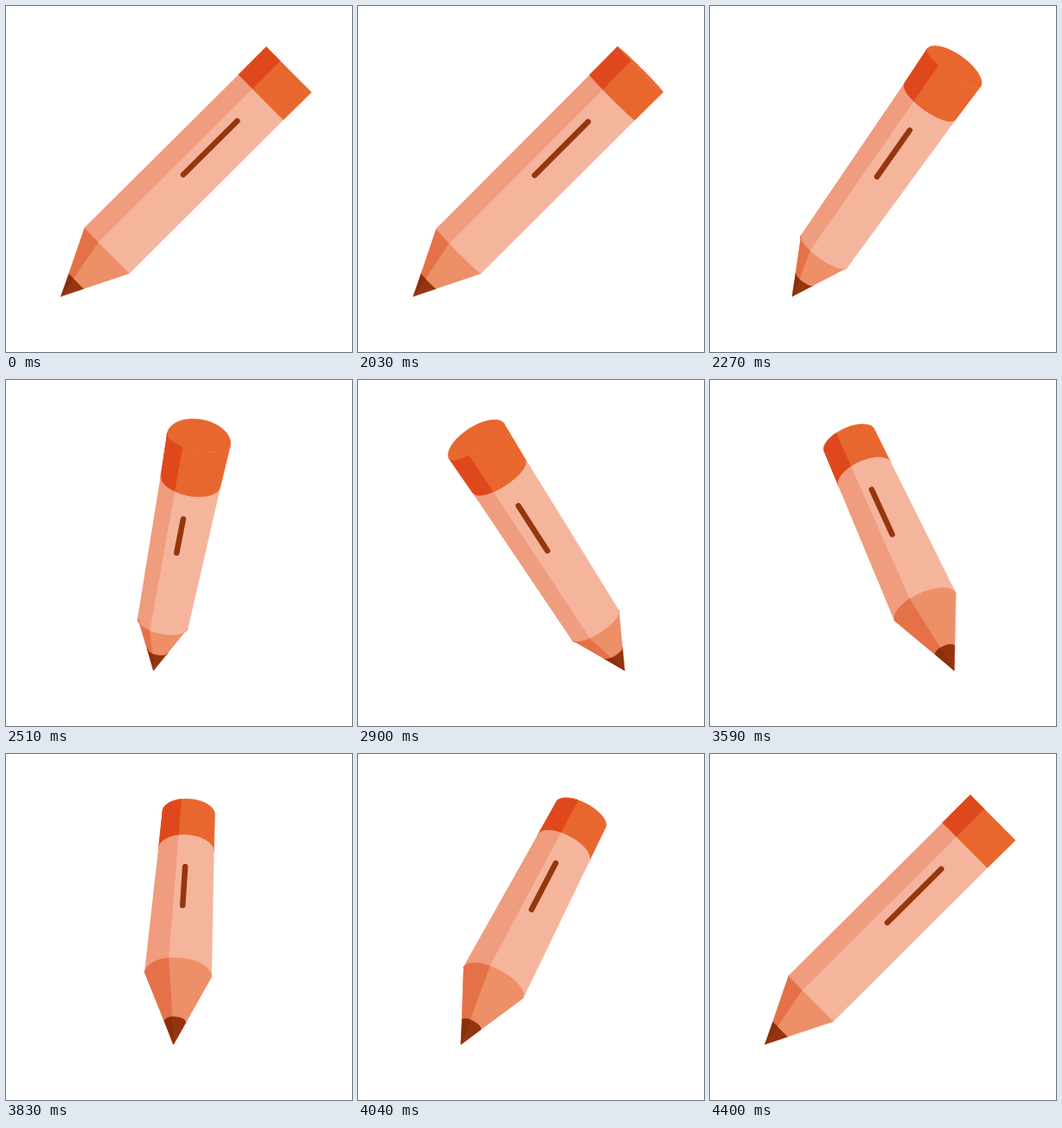
An HTML page with a canvas for the animation above (4430 ms loop, 400 by 400 pixels).

```html
<!DOCTYPE html>
<html lang="en">
<head>
<meta charset="utf-8">
<title>Turning pencil</title>
<style>
  html, body { margin: 0; width: 100%; height: 100%; overflow: hidden; background: #fff; }
  canvas { display: block; width: 400px; height: 400px; }
</style>
</head>
<body>
<canvas id="stage" width="400" height="400"></canvas>
<script>
const ctx = document.getElementById('stage').getContext('2d');
const LOOP = 4430, REST = 2000, TURN = 2400, STEP = 30;
const AXIS_X = 205.5, TIP_Y = 335.5;

// Appends the visible half of a ring, between two angles, to the path.
function arc(ring, from, to) {
  for (let i = 0; i <= 24; i++) {
    const a = from + (to - from) * i / 24;
    ctx.lineTo(ring.r * Math.cos(a), -ring.y + ring.r * ring.sag * Math.sin(a));
  }
}

function fill(color) {
  ctx.closePath();
  ctx.fillStyle = ctx.strokeStyle = color;
  ctx.lineWidth = 0.4;
  ctx.fill();
  ctx.stroke();
}

// A section of the pencil: lit side first, then the shaded strip on the left.
function section(low, high, light, dark, shade) {
  for (const [end, color] of [[0, light], [shade, dark]]) {
    ctx.beginPath();
    arc(high, Math.PI, end);
    arc(low, end, Math.PI);
    fill(color);
  }
}

function draw(time) {
  const elapsed = Math.max(0, time % LOOP - REST);
  const angle = Math.floor(elapsed / STEP) * STEP / TURN * 2 * Math.PI;
  const c = Math.cos(angle), s = Math.sin(angle), s2 = s * s;
  const front = s > 0;
  const vary = (base, a, b) => base + a * s + b * s2;
  const sag = (near, far) => s * (front ? near : far);

  const tipX = AXIS_X - c * (141.5 + 7.5 * s2);
  const topX = AXIS_X + c * (121.5 - 50 * s2);
  const rise = TIP_Y - (73.5 - 5 * s2);
  const length = Math.hypot(topX - tipX, rise);

  const tip = { y: 0, r: 0, sag: 0 };
  const base = { y: vary(74.2, -12.8, -6.8), r: vary(36.8, -4.75, -2.83), sag: sag(0.44, 0.52) };
  const collar = { y: length - vary(46, 3.5, 0.6), r: vary(36.8, 1.4, -3.36), sag: sag(0.49, 0.56) };
  const top = { y: length, r: vary(37.1, 3.4, -3.3), sag: sag(0.36, 0.55) };
  const leadPart = vary(0.325, 0.047, 0.042);
  const lead = { y: base.y * leadPart, r: base.r * leadPart, sag: sag(0.41, 0.5) };
  const shade = Math.acos(-0.385 - 0.07 * s);

  ctx.setTransform(1, 0, 0, 1, 0, 0);
  ctx.fillStyle = '#fff';
  ctx.fillRect(0, 0, 400, 400);
  ctx.translate(tipX, TIP_Y);
  ctx.rotate(Math.atan2(topX - tipX, rise));

  if (front) {
    ctx.beginPath();
    arc({ ...top, sag: -0.64 * s }, Math.PI, 0);
    arc(top, 0, Math.PI);
    fill('#e8672e');
  }
  section(collar, top, '#e8672e', '#df481c', shade);
  section(base, collar, '#f5b59d', '#ef9c7f', shade);
  section(tip, base, '#ed8f67', '#e57148', shade);
  section(tip, lead, '#943510', '#8a2e0d', shade);

  ctx.beginPath();
  ctx.moveTo(0, -vary(199, -12.7, -51.2));
  ctx.lineTo(0, -vary(287, -16.5, -98.3));
  ctx.lineCap = 'round';
  ctx.lineWidth = 6.5;
  ctx.strokeStyle = '#96360f';
  ctx.stroke();
}

function tick() {
  draw(performance.now());
  requestAnimationFrame(tick);
}
tick();
</script>
</body>
</html>
```
